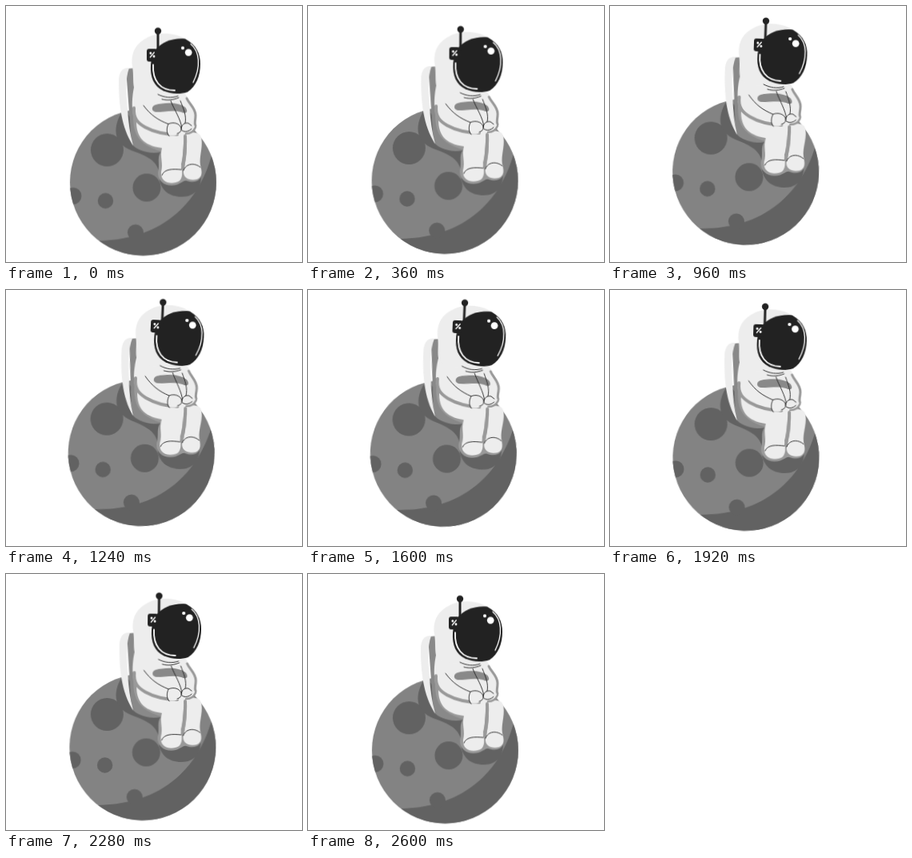
These frames come from a looping animation (370x320 px, 2.64 s). An HTML page:

```html
<!DOCTYPE html>
<html lang="en">
<head>
<meta charset="utf-8">
<title>Astronaut on a moon</title>
<style>
  html, body { margin: 0; width: 100%; height: 100%; overflow: hidden; background: #fff; }
  svg { display: block; width: 370px; height: 320px; }
  .float {
    transform-origin: 171.5px 221px;
    animation: float 1320ms cubic-bezier(.345, 0, .655, 1) -2580ms infinite alternate;
  }
  @keyframes float {
    from { transform: translate(-.1px, -.4px) rotate(0deg); }
    to { transform: translate(-2.4px, -17.9px) rotate(2.7deg); }
  }
  .moon { fill: #838383; }
  .dark { fill: #626262; }
  .suit { fill: #ededed; }
  .shade { fill: #999; }
  .deep { fill: #898989; }
  .black { fill: #222; }
  .white { fill: #fff; }
  .fold, .line, .glint { fill: none; stroke-linecap: round; stroke-linejoin: round; }
  .fold { stroke: #999; stroke-width: 4; }
  .line { stroke: #222; stroke-width: .9; }
  .glint { stroke: #fff; stroke-width: 1.8; }
</style>
</head>
<body>
<svg viewBox="0 0 370 320">
  <defs>
    <clipPath id="disc"><circle cx="171.5" cy="221" r="91.5"/></clipPath>
  </defs>
  <g class="float">
    <circle class="moon" cx="171.5" cy="221" r="91.5"/>
    <g class="dark" clip-path="url(#disc)">
      <path d="M258 183C247 230 210 293 114 294L130 330H280V183Z"/>
      <circle cx="126.5" cy="180.5" r="20.5"/>
      <circle cx="176" cy="227.5" r="17.5"/>
      <circle cx="124.5" cy="244" r="9.7"/>
      <circle cx="162" cy="283.5" r="10"/>
      <circle cx="84" cy="238" r="10.5"/>
      <path d="M147 130C138 142 133 160 143 172C151 181 163 182 174 188C184 193 188 198 191 206L192 219C195 230 203 239 220 239C236 239 244 228 244 213L225 165L165 150Z"/>
    </g>

    <!-- backpack -->
    <path class="deep" d="M150 79L163 78L165 150C166 166 178 172 195 175L194 183C178 186 164 181 157 173Z"/>
    <path class="suit" d="M154 78C145 77 141 84 141 94C141 122 144 152 159 175C155 160 153 146 152 130C150 108 149 92 154 78Z"/>

    <!-- legs -->
    <path class="shade" d="M159 138C159 160 165 174 194 182C188 191 193 197 190 209C190 221 201 227 213 224C220 222 222 218 226 219C238 223 246 217 245 207L236 165Z"/>
    <path class="suit" d="M163 145C163 163 171 175 195 178C192 190 197 196 194 208C193 223 209 224 217 219C222 214 220 205 219 198C222 188 221 177 223 163L216 155Z"/>
    <path class="suit" d="M205 163C216 163 226 166 226 177C226 188 224 197 222 206C221 217 231 219 239 217C246 214 245 207 243 200C241 188 248 173 243 162C239 157 226 157 205 163Z"/>
    <path class="fold" d="M224 163C225 177 223 189 221 204"/>

    <!-- torso and arms -->
    <path class="suit" d="M161 98C157 113 156 137 163 144C173 156 189 161 207 161C222 163 236 159 237 150C238 137 234 124 224 110Z"/>
    <path class="fold" d="M160 128C159 141 165 147 174 152C187 159 202 161 214 161"/>
    <path class="fold" d="M226 116C229 123 237 128 237 137C237 145 235 147 237 150" style="stroke-width:3"/>
    <path class="fold" d="M225 160C231 160 235 157 237 152" style="stroke-width:2.5"/>
    <path class="deep" d="M187 133C181 132 182 125 187 124C198 121 215 120 224 127C229 133 225 136 219 133C208 130 199 133 187 133Z"/>
    <path class="line" d="M172 125C181 137 190 143 203 148M206 119C210 130 219 142 220 154M218 119C222 129 226 138 224 147"/>

    <!-- hands -->
    <path class="suit" d="M203 148C209 145 217 147 219 153C219 161 211 164 204 162C200 158 201 152 203 148Z"/>
    <path class="suit" d="M221 149C226 145 231 147 233 152C232 157 224 160 219 156Z"/>
    <path class="line" d="M204 163C200 159 201 152 203 148C209 145 217 147 219 153C220 157 217 159 214 160M219 155C219 149 223 146 228 147L232 150M220 156C224 159 229 157 232 154"/>
    <path class="line" d="M195 212C198 204 208 204 219 205M222 206C225 197 236 196 243 202"/>

    <!-- helmet -->
    <path class="suit" d="M225 42C212 34 190 32 175 41C160 49 156 62 158 76C160 88 158 97 161 106C170 114 190 113 213 112Z"/>
    <path class="line" d="M190 111C198 115 207 116 215 113M195 117C202 119 209 118 216 115"/>
    <path class="black" d="M224 41.5C210 40 195 45 187 55C180 65 179 83 184 94C191 109 212 113 227 108C238 101 243 87 243 73C243 60 238 49 224 41.5Z"/>
    <path class="glint" d="M184 74C183 94 193 106 211 106"/>
    <path class="glint" d="M231 48C242 57 244 76 234 96" style="stroke-width:1.3"/>
    <circle class="white" cx="228.2" cy="58.6" r="4.4"/>
    <circle class="white" cx="221" cy="53" r="2.1"/>

    <!-- earpiece and antenna -->
    <rect class="black" x="176" y="54" width="13" height="16" rx="3"/>
    <path class="glint" d="M180.3 64.5L185.3 58.5" style="stroke-width:1.3"/>
    <circle class="white" cx="180.8" cy="59.5" r="1.4"/>
    <circle class="white" cx="185" cy="63.5" r="1.4"/>
    <path class="line" d="M190 32V57" style="stroke-width:3"/>
    <circle class="black" cx="190" cy="31.7" r="4.2"/>
  </g>
</svg>
</body>
</html>
```
